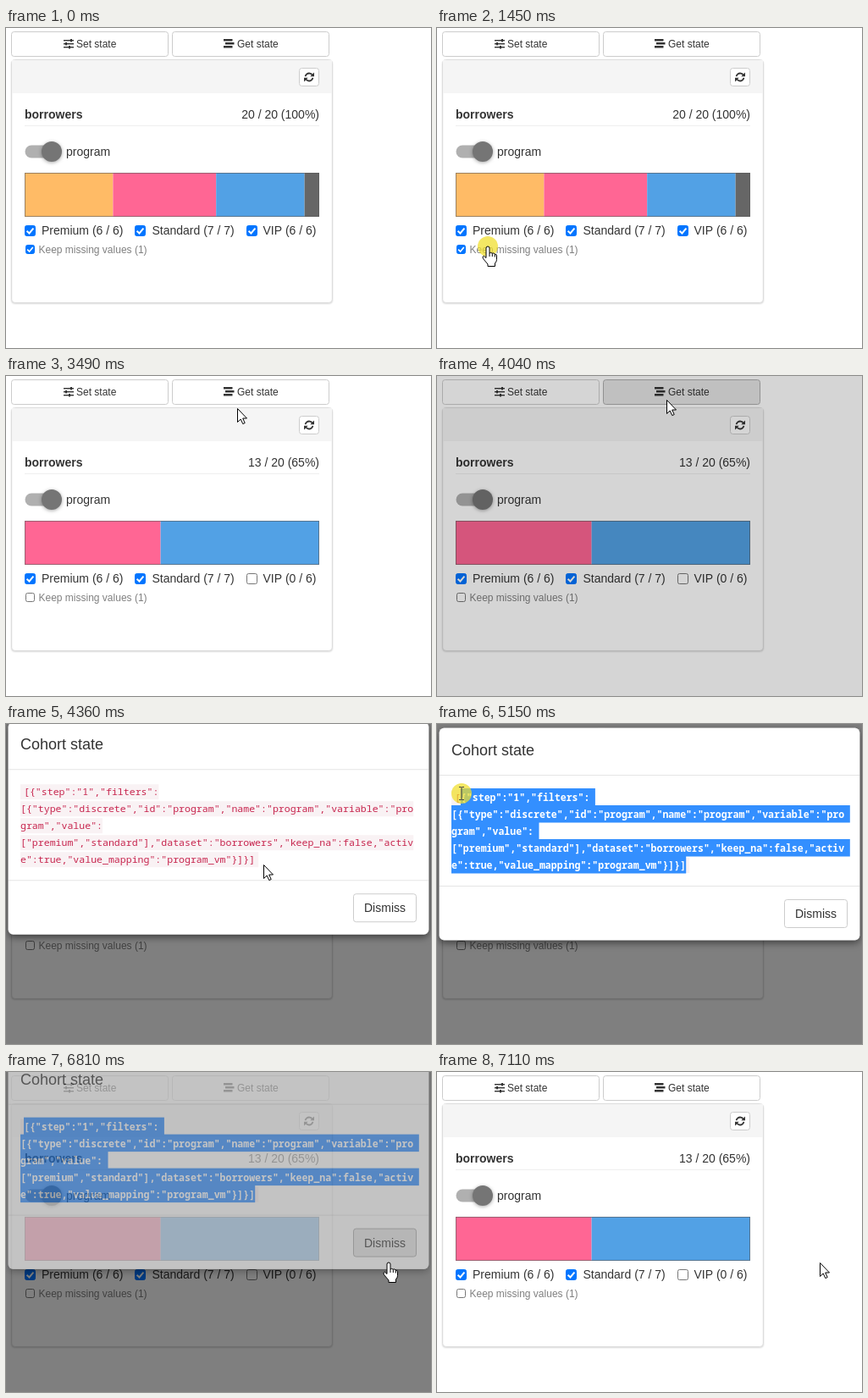
Recreate the animation shown at these times as an HTML page with a canvas. Size 502 by 378 pixels, loop 8000 ms.

```html
<!DOCTYPE html>
<html lang="en">
<head>
<meta charset="utf-8">
<title>Cohort state</title>
<style>
html, body { margin: 0; width: 100%; height: 100%; overflow: hidden; background: #fff; }
canvas { display: block; }
</style>
</head>
<body>
<canvas id="stage" width="502" height="378"></canvas>
<script>
const W = 502, H = 378, LOOP = 8000;
const stage = document.getElementById('stage').getContext('2d');
const layer = document.createElement('canvas');
layer.width = W;
layer.height = H;
const sheet = layer.getContext('2d');
let g = stage;

const SANS = '"Liberation Sans", Arial, sans-serif';
const MONO = '11.55px "Noto Sans Mono", "DejaVu Sans Mono", monospace';
const CHAR = 6.93;
const CODE = [
  '[{"step":"1","filters":',
  '[{"type":"discrete","id":"program","name":"program","variable":"pro',
  'gram","value":',
  '["premium","standard"],"dataset":"borrowers","keep_na":false,"activ',
  'e":true,"value_mapping":"program_vm"}]}]'
];

// Moments of the story, in ms
const KEEP_OFF = 1460, KEEP_DONE = 1770, VIP_OFF = 2420, VIP_DONE = 2640;
const OPEN = 3992, SHOW = OPEN + 150, DRAG = 4750, DROP = 5400;
const HIDE = 6741, GONE = HIDE + 150;

// Cursor stops: time, x, y
const PATH = [
  [760, 386, 325], [1220, 60, 258], [1720, 60, 258], [2170, 314, 235],
  [2900, 314, 235], [3580, 271, 28], [4060, 271, 28], [4360, 304, 166],
  [4680, 312, 178], [DRAG, 312, 178], [5150, 29, 82], [DROP, 22, 77],
  [5830, 22, 77], [6260, 450, 238], [6340, 452, 225]
];
// Mouse button held: from, to
const PRESSES = [[1390, 1470], [2340, 2430], [3880, 3960], [DRAG, 5630], [6640, 6730]];

const clamp = v => Math.max(0, Math.min(1, v));
const ramp = (t, from, ms) => clamp((t - from) / ms);
const smooth = p => p * p * (3 - 2 * p);

// cubic-bezier(0, 0, .58, 1)
function easeOut(p) {
  let lo = 0, hi = 1;
  for (let i = 0; i < 20; i++) {
    const s = (lo + hi) / 2;
    if (1.74 * s * s - 0.74 * s * s * s < p) lo = s; else hi = s;
  }
  return smooth(lo);
}

function cursorAt(t) {
  if (t < PATH[0][0]) return null;
  for (let i = 1; i < PATH.length; i++) {
    const [t0, x0, y0] = PATH[i - 1], [t1, x1, y1] = PATH[i];
    if (t < t1) {
      const p = smooth((t - t0) / (t1 - t0));
      return { x: x0 + (x1 - x0) * p, y: y0 + (y1 - y0) * p };
    }
  }
  const [, x, y] = PATH[PATH.length - 1];
  return { x, y };
}

const inside = (c, x0, y0, x1, y1) => !!c && c.x >= x0 && c.x <= x1 && c.y >= y0 && c.y <= y1;

function text(str, x, y, size = 14, color = '#333', align = 'left', weight = '') {
  g.font = `${weight} ${size}px ${SANS}`;
  g.fillStyle = color;
  g.textAlign = align;
  g.fillText(str, x, y);
}

function rect(x, y, w, h, color) {
  g.fillStyle = color;
  g.fillRect(x, y, w, h);
}

function box(x, y, w, h, r, fill, stroke) {
  g.beginPath();
  g.roundRect(x + 0.5, y + 0.5, w - 1, h - 1, r);
  g.fillStyle = fill;
  g.fill();
  if (stroke) {
    g.strokeStyle = stroke;
    g.lineWidth = 1;
    g.stroke();
  }
}

function disc(x, y, r, color) {
  g.beginPath();
  g.arc(x, y, r, 0, 7);
  g.fillStyle = color;
  g.fill();
}

function shadow(color, blur, dy) {
  g.shadowColor = color;
  g.shadowBlur = blur;
  g.shadowOffsetY = dy;
}
const noShadow = () => shadow('transparent', 0, 0);

const button = (x, y, w, h, hot) =>
  box(x, y, w, h, 3, hot ? '#e6e6e6' : '#fff', hot ? '#adadad' : '#ccc');

function checkbox(x, y, size, on) {
  if (!on) return box(x, y, size, size, 2, '#fff', '#767676');
  box(x, y, size, size, 2, '#0075ff', '#0075ff');
  g.beginPath();
  g.moveTo(x + size * 0.2, y + size * 0.52);
  g.lineTo(x + size * 0.42, y + size * 0.73);
  g.lineTo(x + size * 0.8, y + size * 0.27);
  g.strokeStyle = '#fff';
  g.lineWidth = size * 0.15;
  g.stroke();
}

function refreshIcon(x, y) {
  g.strokeStyle = g.fillStyle = '#333';
  g.lineWidth = 1.8;
  for (const turn of [0, Math.PI]) {
    g.save();
    g.translate(x, y);
    g.rotate(turn);
    g.beginPath();
    g.arc(0, 0, 4.5, Math.PI + 0.2, -0.55);
    g.stroke();
    g.beginPath();
    g.moveTo(6, -5.5);
    g.lineTo(6, -0.8);
    g.lineTo(1.3, -0.8);
    g.fill();
    g.restore();
  }
}

function toolbar(hot) {
  button(6, 4, 186, 30, false);
  button(196, 4, 186, 30, hot);
  [76, 70, 74].forEach((knob, i) => {
    rect(68, 14 + i * 4, 12, 1.4, '#333');
    rect(knob, 13 + i * 4, 2, 3.4, '#333');
  });
  [257, 259, 257].forEach((x, i) => rect(x, 13 + i * 4, 10.5, 2.5, '#333'));
  text('Set state', 83, 23, 12);
  text('Get state', 273, 23, 12);
}

function bar(parts) {
  const total = parts.reduce((sum, [n]) => sum + n, 0);
  let x = 22;
  for (const [n, color] of parts) {
    const w = 348 * n / total;
    rect(x, 171, w, 52, color);
    x += w;
  }
  g.strokeStyle = 'rgba(90,90,90,.6)';
  g.lineWidth = 1;
  g.strokeRect(22.5, 171.5, 347, 51);
}

function page(t, cursor) {
  const orange = '#ffbb66', pink = '#ff6694', blue = '#52a1e5';
  const vipDone = t >= VIP_DONE, keepDone = t >= KEEP_DONE;

  rect(0, 0, W, H, '#fff');
  toolbar(t < SHOW && inside(cursor, 196, 4, 382, 34));

  shadow('rgba(0,0,0,.12)', 2, 1);
  box(6, 37, 380, 288, 4, '#fff', '#ddd');
  noShadow();
  rect(7, 38, 378, 39, '#f5f5f5');
  button(346, 47, 24, 22, false);
  refreshIcon(358, 58);

  text('borrowers', 22, 107, 14, '#333', 'left', 'bold');
  const waiting = (t >= 1530 && !keepDone) || (t >= 2490 && !vipDone);
  g.globalAlpha = waiting ? 0.3 : 1;
  text(vipDone ? '13 / 20 (65%)' : keepDone ? '19 / 20 (95%)' : '20 / 20 (100%)', 370, 107, 14, '#333', 'right');
  g.globalAlpha = 1;
  rect(22, 115, 348, 1, '#eee');

  box(22, 138, 40, 16, 8, '#b0b0b0');
  shadow('rgba(0,0,0,.35)', 4, 1);
  disc(54, 146, 12, '#757575');
  noShadow();
  text('program', 71, 151);

  bar(vipDone ? [[6, pink], [7, blue]]
    : [[6, orange], [7, pink], [6, blue], [keepDone ? 0 : 1, '#666']]);

  checkbox(22, 233, 13, true);
  text('Premium (6 / 6)', 42, 244);
  checkbox(152, 233, 13, true);
  text('Standard (7 / 7)', 172.5, 244);
  checkbox(284, 233, 13, t < VIP_OFF);
  text(`VIP (${vipDone ? 0 : 6} / 6)`, 303.5, 244);
  checkbox(23, 256, 11, t < KEEP_OFF);
  text('Keep missing values (1)', 38.5, 266, 12, '#808080');
}

const lineX = i => i ? 17 : 21;

// First selected line and column while dragging up from the end
function selection(t) {
  if (t < DRAG) return null;
  const c = cursorAt(Math.min(t, DROP));
  const line = Math.floor((c.y - 76) / 20);
  if (line >= CODE.length) return null;
  const col = Math.round((c.x - lineX(line)) / CHAR);
  return { line, col: Math.max(0, Math.min(CODE[line].length, col)) };
}

function codeBlock(t) {
  const sel = selection(t), last = CODE.length - 1;
  CODE.forEach((str, i) => {
    const x = lineX(i), y = 76 + i * 20, end = x + str.length * CHAR;
    rect(17, y + 2, end - 17 + (i === last ? 4 : 0), 18, '#f9f2f4');
    const from = !sel || i < sel.line ? str.length : i === sel.line ? sel.col : 0;
    const selX = x + from * CHAR;
    if (sel && i >= sel.line) rect(selX, y, end - selX + (i === last ? 0 : 6.5), 20.5, '#338fff');
    g.textAlign = 'left';
    g.font = MONO;
    g.fillStyle = '#c7254e';
    g.fillText(str.slice(0, from), x, y + 15);
    g.font = '600 ' + MONO;
    g.fillStyle = '#fff';
    g.fillText(str.slice(from), selX, y + 15);
  });
}

function modal(t, cursor) {
  const leaving = t >= HIDE;
  const alpha = leaving ? 1 - ramp(t, HIDE, 150) : ramp(t, SHOW, 150);
  if (!alpha) return;
  const slide = leaving ? easeOut(ramp(t, HIDE, 300)) : 1 - easeOut(ramp(t, SHOW, 300));

  g = sheet;
  g.clearRect(0, 0, W, H);
  g.save();
  g.translate(0, -63 * slide);
  shadow('rgba(0,0,0,.5)', 9, 3);
  box(2, 4, 498, 252, 6, '#fff');
  noShadow();
  box(2, 4, 498, 252, 6, '#fff', 'rgba(0,0,0,.2)');
  text('Cohort state', 17, 37, 18);
  rect(3, 60, 496, 1, '#e5e5e5');
  codeBlock(t);
  rect(3, 191, 496, 1, '#e5e5e5');
  button(410, 207, 75, 34, leaving || inside(cursor, 410, 207, 485, 241));
  text('Dismiss', 447.5, 229, 14, '#333', 'center');
  g.restore();

  g = stage;
  g.globalAlpha = alpha;
  g.drawImage(layer, 0, 0);
  g.globalAlpha = 1;
}

const ARROW = new Path2D('M.5 .5V16.5L4.2 13L6.8 18.6L9.2 17.5L6.7 12H11.5Z');
const HAND = new Path2D('M-2 2Q-2 0 0 0Q2 0 2 2V8Q3.5 6.5 5.3 8.2Q7 7 8.3 9.2Q10.5 8.5 10.5 11V15.5Q10.5 18 8.5 20V23.5H0V21L-5.5 14.5Q-7 11.5 -4.5 11.3L-2 13.5Z');
const KNUCKLES = new Path2D('M2 8V12M5.3 8.2V12M8.3 9.2V12.5');
const BEAM = new Path2D('M-3 -7.5H-.5L0 -7L.5 -7.5H3M0 -7V7M-3 7.5H-.5L0 7L.5 7.5H3');

function cursorKind(t, c) {
  if (t < OPEN) {
    const hot = inside(c, 196, 4, 382, 34) || inside(c, 284, 231, 367, 248) || inside(c, 22, 254, 168, 269);
    return hot ? 'hand' : 'arrow';
  }
  if (t >= GONE) return 'arrow';
  if (t >= DRAG - 70 && t < 5860) return 'beam';
  return inside(c, 410, 207, 485, 241) ? 'hand' : 'arrow';
}

function pointer(t, c) {
  if (!c) return;
  if (PRESSES.some(([from, to]) => t >= from && t < to)) disc(c.x, c.y, 12, 'rgba(240,222,40,.72)');
  const kind = cursorKind(t, c);
  g.save();
  g.translate(Math.round(c.x), Math.round(c.y));
  g.lineWidth = 1;
  if (kind === 'beam') {
    g.strokeStyle = '#444';
    g.stroke(BEAM);
  } else {
    const shape = kind === 'hand' ? HAND : ARROW;
    g.fillStyle = '#fff';
    g.strokeStyle = '#000';
    g.lineJoin = 'round';
    g.fill(shape);
    g.stroke(shape);
    if (kind === 'hand') g.stroke(KNUCKLES);
  }
  g.restore();
}

function draw(t) {
  const cursor = cursorAt(t);
  page(t, cursor);
  const dim = 0.5 * (ramp(t, OPEN, 150) - ramp(t, GONE, 150));
  if (dim > 0) rect(0, 0, W, H, `rgba(0,0,0,${dim})`);
  if (t >= SHOW && t < GONE) modal(t, cursor);
  pointer(t, cursor);
}

const start = performance.now();
function tick() {
  draw((performance.now() - start) % LOOP);
  requestAnimationFrame(tick);
}
tick();
</script>
</body>
</html>
```
